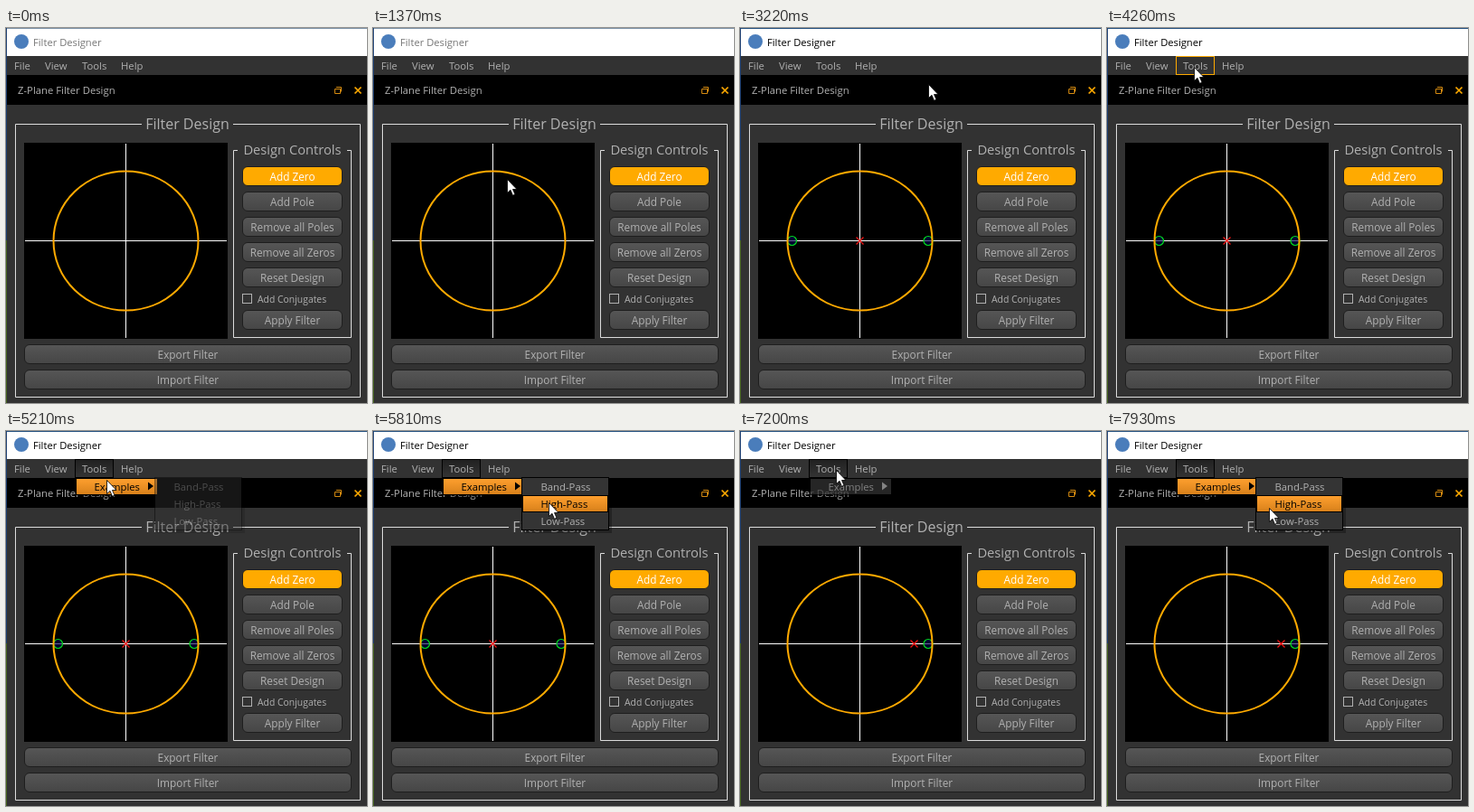
Recreate the animation shown at these times as an HTML page. Size 399 px wide and 415 px high, loop 7990 ms.

```html
<!DOCTYPE html>
<html lang="en">
<head>
<meta charset="utf-8">
<title>Filter Designer</title>
<style>
html, body { margin: 0; width: 100%; height: 100%; overflow: hidden; background: #323232; }
svg { display: block; }
text { font: 11.3px "Open Sans", "Noto Sans", sans-serif; fill: #b1b1b1; }
.mid { text-anchor: middle; }
.btn text { font-size: 11.8px; text-anchor: middle; }
.line { fill: none; stroke: #dcdcdc; }
.on text { fill: #000; }
</style>
</head>
<body>
<svg width="399" height="415" viewBox="0 0 399 415">
  <defs>
    <linearGradient id="grey" x2="0" y2="1"><stop stop-color="#565656"/><stop offset="1" stop-color="#464646"/></linearGradient>
    <linearGradient id="orange" x2="0" y2="1"><stop stop-color="#ffa02f"/><stop offset="1" stop-color="#d7801a"/></linearGradient>
    <linearGradient id="pressed" x2="0" y2="1"><stop stop-color="#212121"/><stop offset="1" stop-color="#343434"/></linearGradient>
  </defs>

  <!-- window -->
  <rect width="399" height="415" fill="#323232"/>
  <rect width="399" height="31" fill="#fff"/>
  <rect id="edge" width="399" height="1"/>
  <rect width="1" height="235" fill="#1d3f72"/>
  <rect y="235" width="1" height="180" fill="#47661f"/>
  <circle cx="17" cy="15" r="8" fill="#4a7dbb"/>
  <text id="title" x="30" y="20" style="font-size:11.2px">Filter Designer</text>
  <rect id="tools" x="76.5" y="31.5" width="42" height="20"/>
  <text x="9" y="46">File</text><text x="43" y="46">View</text>
  <text x="84" y="46">Tools</text><text x="127" y="46">Help</text>
  <rect x="1" y="52" width="398" height="33"/>
  <text x="13" y="73">Z-Plane Filter Design</text>
  <path d="M363.5 67.5h6v5h-6zM365 65.5h5.500v5" fill="none" stroke="#d48a10"/>
  <path d="M385.500 65.500l7 7m0-7l-7 7" stroke="#ffaa00" stroke-width="1.700"/>

  <!-- panels -->
  <path class="line" d="M150 106.500H10.500V408.500H391.500V106.500H251"/>
  <text class="mid" x="200.500" y="112" style="font-size:16px">Filter Design</text>
  <path class="line" d="M256 135.500H251.500V342.500H381.500V135.500H377"/>
  <text class="mid" x="316.500" y="140" style="font-size:14.700px" id="controls">Design Controls</text>
  <g id="buttons" class="btn"></g>
  <rect x="261.500" y="294.500" width="10" height="10" fill="#323232" stroke="#b1b1b1"/>
  <text x="278" y="304" style="font-size:10.400px">Add Conjugates</text>

  <!-- z-plane -->
  <rect x="20" y="127" width="225" height="217"/>
  <path d="M21 235.500H244M132.500 128V343" stroke="#fff"/>
  <g id="zeros" fill="#000050" fill-opacity=".6" stroke="#00e020" stroke-width="1.200"></g>
  <ellipse cx="132.500" cy="235.500" rx="80" ry="77" fill="none" stroke="#ffaa00" stroke-width="2"/>
  <path id="pole" d="M-4-4L4 4M4-4L-4 4" stroke="#f01010" stroke-width="1.300"/>

  <!-- menus -->
  <g id="menu"><rect x="80" y="55" width="91" height="19" fill-opacity=".3"/></g>
  <g id="sub"><rect x="167" y="54" width="97" height="59" fill-opacity=".3"/><rect x="164" y="51" width="97" height="59"/></g>

  <path id="cursor" d="M.500.500V15.500L4 12.300L6.500 18.300L9 17.200L6.500 11.500H11Z" fill="#fff" stroke="#000" stroke-width=".8"/>
</svg>
<script>
const LOOP = 7990;
const $ = id => document.getElementById(id);

function add(parent, tag, attrs, label) {
  const node = document.createElementNS('http://www.w3.org/2000/svg', tag);
  for (const key in attrs) node.setAttribute(key, attrs[key]);
  if (label) node.textContent = label;
  return parent.appendChild(node);
}

function button(label, x, y, width, active) {
  const box = $('buttons');
  add(box, 'rect', { x: x + .5, y: y + .5, width, height: 21, rx: 5.5,
    fill: active ? '#ffaa00' : 'url(#grey)', stroke: '#1e1e1e' });
  const text = add(box, 'text', { x: x + width / 2 + .5, y: y + 15.5 }, label);
  if (active) text.style.fill = '#fff';
}
['Add Zero', 'Add Pole', 'Remove all Poles', 'Remove all Zeros', 'Reset Design']
  .forEach((label, i) => button(label, 261, 153 + 28 * i, 110, !i));
button('Apply Filter', 261, 312, 110);
button('Export Filter', 20, 350, 361);
button('Import Filter', 20, 378, 361);

function menuItem(parent, label, x, y, width, height) {
  const group = add(parent, 'g', {});
  const back = add(group, 'rect', { x: x + .5, y: y + .5, width: width - 1, height: height - 1, stroke: '#000' });
  add(group, 'text', { x: x + 20.5, y: y + 14 }, label);
  return { group, select(on) {
    group.setAttribute('class', on ? 'on' : '');
    back.setAttribute('fill', on ? 'url(#orange)' : '#343434');
    back.setAttribute('stroke', on ? '#000' : parent.id === 'sub' ? '#343434' : '#000');
  } };
}
const examples = menuItem($('menu'), 'Examples', 77, 52, 91, 19);
const arrow = add(examples.group, 'path', { d: 'M157 56.500l6 4.500l-6 4.500z' });
const items = ['Band-Pass', 'High-Pass', 'Low-Pass']
  .map((label, i) => menuItem($('sub'), label, 165, 52 + 19 * i, 95, 19));
const zeros = [57.5, 208].map(cx => add($('zeros'), 'circle', { cx, cy: 235.5, r: 5 }));

// cursor stops: time, x, y
const path = [
  [1070, 250, 414], [1560, 97, 44], [1850, 97, 44], [2280, 115, 59], [2450, 115, 59],
  [2650, 150, 60], [3040, 208, 62], [3410, 208, 62], [3600, 190, 70], [4070, 96, 43],
  [4780, 96, 43], [5210, 111, 54], [5280, 125, 57], [5570, 196, 64], [5810, 194, 79],
  [6510, 194, 79], [6700, 172, 81], [7110, 106, 43], [7320, 106, 43], [7520, 114, 59],
  [7650, 135, 61], [7800, 170, 66], [7930, 179, 85], [LOOP, 179, 85]
];
// menu sessions: menu opens, submenu opens, click closes both
const sessions = [[1640, 2440, 3220], [4450, 5130, 6070], [7060, 7570, LOOP]];

const clamp = v => Math.max(0, Math.min(1, v));
const fade = (t, start) => clamp((t - start) / 190);
const show = (node, on) => { node.style.display = on ? '' : 'none'; };

function cursorAt(t) {
  const i = path.findIndex(stop => stop[0] > t);
  if (i < 1) return null;
  const [a, b] = [path[i - 1], path[i]];
  const k = (t - a[0]) / (b[0] - a[0]);
  const e = k * k * (3 - 2 * k);
  return [a[1] + (b[1] - a[1]) * e, a[2] + (b[2] - a[2]) * e];
}

function draw(now) {
  const t = now % LOOP;
  const pos = cursorAt(t);
  const [x, y] = pos || [-50, -50];
  const open = sessions.find(s => t >= s[0] && t < s[2]);
  const subAlpha = open ? fade(t, open[1]) : 0;

  show($('cursor'), pos);
  $('cursor').setAttribute('transform', `translate(${Math.round(x)} ${Math.round(y)})`);

  const active = t >= sessions[0][0];
  $('title').style.fill = active ? '#000' : '#777';
  $('edge').setAttribute('fill', active ? '#24517f' : '#7d93a8');

  const hover = x > 76 && x < 119 && y > 31 && y < 52;
  $('tools').setAttribute('fill', open ? 'url(#pressed)' : 'none');
  $('tools').setAttribute('stroke', open ? '#000' : hover ? '#ffaa00' : 'none');

  $('menu').style.opacity = open ? fade(t, open[0]) : 0;
  $('sub').style.opacity = subAlpha;
  const lit = open && (y >= 52 || subAlpha > 0);
  examples.select(lit);
  arrow.setAttribute('fill', lit ? '#000' : '#b1b1b1');
  const row = subAlpha && x >= 164 ? Math.floor((y - 52) / 19) : -1;
  items.forEach((item, i) => item.select(i === row));

  const band = t >= sessions[0][2], high = t >= sessions[1][2];
  show(zeros[0], band && !high);
  show(zeros[1], band);
  show($('pole'), band);
  $('pole').setAttribute('transform', `translate(${high ? 192.5 : 132.5} 235.5)`);
}

const start = performance.now();
function tick() {
  draw(performance.now() - start);
  requestAnimationFrame(tick);
}
tick();
</script>
</body>
</html>
```
